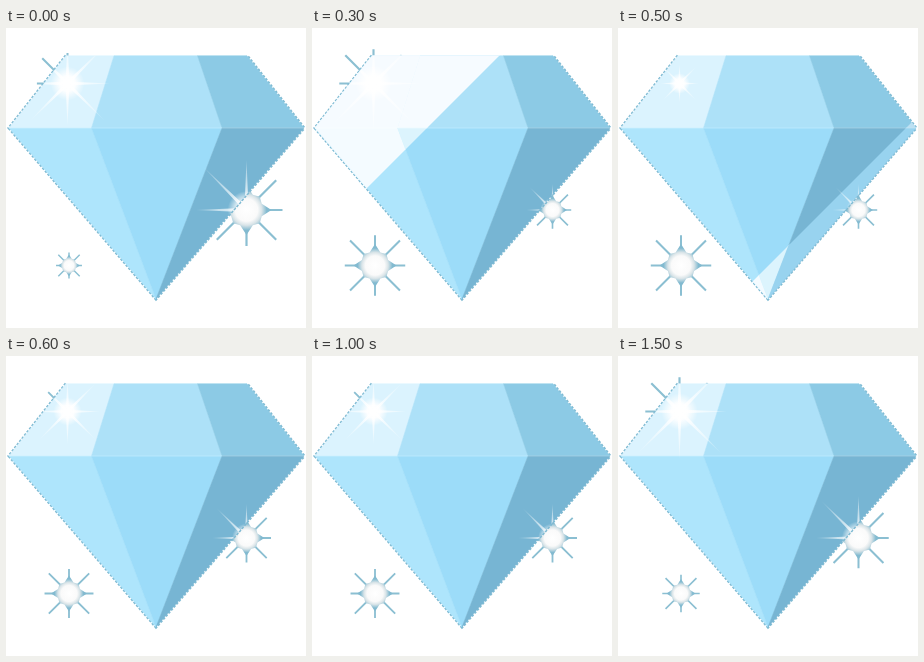
These frames come from a looping animation (300 px wide and 300 px high, 1.6 s). An HTML page with a canvas:

```html
<!DOCTYPE html>
<html lang="en">
<head>
<meta charset="utf-8">
<title>Sparkling diamond</title>
<style>
  html, body { margin: 0; height: 100%; overflow: hidden; background: #fff; }
  canvas { display: block; }
</style>
</head>
<body>
<canvas id="stage" width="300" height="300"></canvas>
<script>
const ctx = document.getElementById('stage').getContext('2d');
const STEP = 100, LOOP = 1600;

// Girdle corners, crown corners and the bottom tip
const west = [3, 100], innerWest = [85.5, 100], innerEast = [216, 100], east = [298, 100];
const crown = [[60, 27.7], [108, 27.7], [191.5, 27.7], [241, 27.7]];
const tip = [150, 271];
const outline = [crown[0], west, tip, east, crown[3]];

const facets = [
  { points: [crown[0], crown[1], innerWest, west], base: '#dbf3fe', lit: '#f6fbff' },
  { points: [crown[1], crown[2], innerEast, innerWest], base: '#ade1f8', lit: '#f6fbff' },
  { points: [crown[2], crown[3], east, innerEast], base: '#8ccae5', lit: '#bce0f2' },
  { points: [west, innerWest, tip], base: '#aee5fc', lit: '#f4fbff' },
  { points: [innerWest, innerEast, tip], base: '#9cdcf9', lit: '#dcf4fd' },
  { points: [innerEast, east, tip], base: '#77b5d3', lit: '#98d3ef' }
];

function trace(points, close = true) {
  ctx.beginPath();
  points.forEach(p => ctx.lineTo(...p));
  if (close) ctx.closePath();
}

function drawFacets(shade) {
  for (const facet of facets) {
    trace(facet.points);
    ctx.fillStyle = ctx.strokeStyle = facet[shade];
    ctx.lineWidth = 0.5;
    ctx.fill();
    ctx.stroke();
  }
}

function drawDiamond(step) {
  trace(outline, false);
  ctx.strokeStyle = '#80bbd3';
  ctx.lineWidth = 3;
  ctx.setLineDash([2.5, 1.5]);
  ctx.stroke();
  ctx.setLineDash([]);
  drawFacets('base');

  // Diagonal glint between the lines x + y = tail and x + y = head
  const head = 215 + 150 * (step - 3), tail = head - 127;
  ctx.save();
  trace([[tail, 0], [head, 0], [head - 300, 300], [tail - 300, 300]]);
  ctx.clip();
  drawFacets('lit');
  ctx.restore();

  trace([west, east], false);
  ctx.strokeStyle = 'rgba(255,255,255,.13)';
  ctx.lineWidth = 2;
  ctx.stroke();
}

function starPoints(x, y, radius, diagonal, waist) {
  return Array.from({ length: 16 }, (_, i) => {
    const r = i % 2 ? waist : i % 4 ? diagonal : radius;
    const a = i * Math.PI / 8;
    return [x + r * Math.cos(a), y + r * Math.sin(a)];
  });
}

function radial(x, y, radius, ...stops) {
  const gradient = ctx.createRadialGradient(x, y, 0, x, y, radius);
  stops.forEach(stop => gradient.addColorStop(...stop));
  return gradient;
}

// Blue-edged body and thin rays, seen against the white ground
function drawFringe({ x, y, size }) {
  ctx.beginPath();
  for (const [rx, ry] of starPoints(x, y, 36 * size, 42 * size, 0)) {
    ctx.moveTo(x, y);
    ctx.lineTo(rx, ry);
  }
  ctx.strokeStyle = '#8bbfd2';
  ctx.lineWidth = 1 + 1.2 * size;
  ctx.stroke();

  const reach = 3 + 22 * size;
  trace(starPoints(x, y, reach, reach * 0.75, reach * 0.66));
  ctx.fillStyle = radial(x, y, reach * 0.9, [0, '#fff'], [0.5, '#fafafa'], [0.68, '#d9e4e8'], [0.9, '#82bad0']);
  ctx.fill();
}

// Soft white flare, seen against the stone
function drawFlare({ x, y, size }) {
  const reach = 62 * size, core = 5 + 14 * size;
  trace(starPoints(x, y, 50 * size, reach, 2 + 3 * size));
  ctx.fillStyle = radial(x, y, reach, [0, '#fff'], [0.25, 'rgba(255,255,255,.75)'], [1, 'rgba(255,255,255,.1)']);
  ctx.fill();
  ctx.beginPath();
  ctx.arc(x, y, core, 0, 2 * Math.PI);
  ctx.fillStyle = radial(x, y, core, [0, '#fff'], [0.45, 'rgba(255,255,255,.95)'], [1, 'rgba(255,255,255,0)']);
  ctx.fill();
}

function render(time) {
  const step = Math.floor(time % LOOP / STEP);
  const swell = 0.36 + 0.64 * Math.abs(step % 8 - 4) / 4;
  const sparkles = [
    { x: 240.5, y: 182, size: swell },
    { x: 63, y: 237.5, size: 1.36 - swell },
    { x: 61.5, y: 55.5, size: [0.85, 0.38, 0.65, 0.95][step % 4] }
  ];
  ctx.fillStyle = '#fff';
  ctx.fillRect(0, 0, 300, 300);
  sparkles.forEach(drawFringe);
  drawDiamond(step);

  ctx.save();
  trace(outline);
  ctx.clip();
  sparkles.forEach(drawFlare);
  ctx.restore();
}

const start = performance.now();
function tick() {
  render(performance.now() - start);
  requestAnimationFrame(tick);
}
tick();
</script>
</body>
</html>
```
